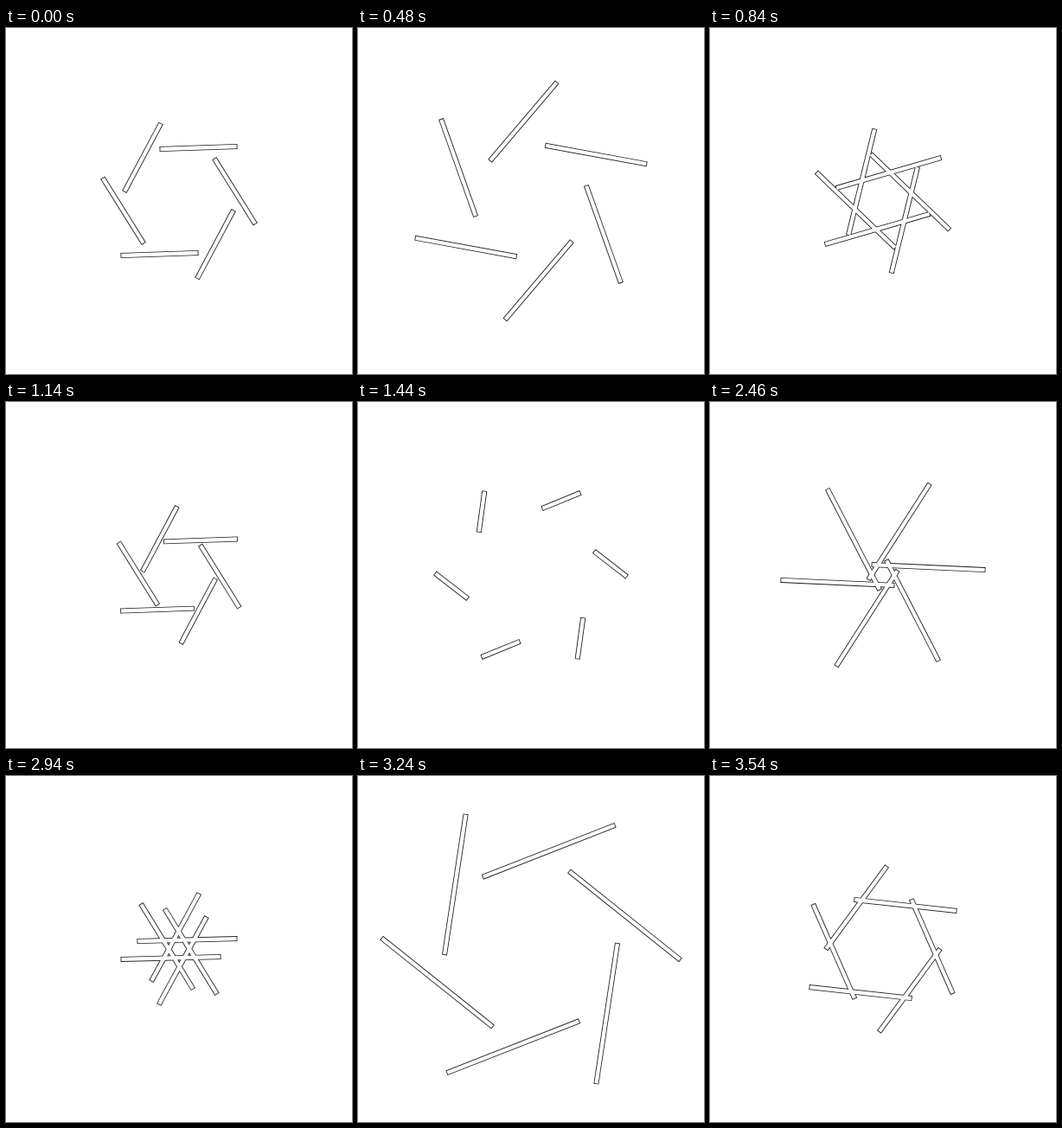
An HTML page with a canvas for the animation above (3600 ms loop, 400 px wide and 400 px high).

```html
<!DOCTYPE html>
<html lang="en">
<head>
<meta charset="utf-8">
<title>Six turning bars</title>
<style>
html, body { margin: 0; width: 100%; height: 100%; overflow: hidden; background: #fff; }
canvas { display: block; width: 400px; height: 400px; }
</style>
</head>
<body>
<canvas id="stage" width="400" height="400"></canvas>
<script>
const ctx = document.getElementById('stage').getContext('2d');
const STEPS = 60, STEP_MS = 60, TAU = Math.PI * 2, DEG = Math.PI / 180;

// step, drift x, centre y, length, extra tilt (degrees)
const keys = [
  [0, 48.4, -61.5, 89, -4.9],
  [9, 32, -66, 122, 0],
  [14, 35.1, -27, 126, 1.7],
  [24, 34.9, -64.3, 47.5, -0.8],
  [33, 13.8, -73.2, 62.3, -4.9],
  [41, 31.8, -3.4, 131, 0.5],
  [49, 24.3, -11.4, 115, 1.3],
  [54, 33, -95, 164, 0],
  [59, 36.5, -53, 118.7, -5.9]
];

// Periodic access to the key list
function keyAt(i) {
  const n = keys.length, turn = Math.floor(i / n);
  const key = keys[i - turn * n].slice();
  key[0] += turn * STEPS;
  return key;
}

// Smooth curve through the keys for every column
function pose(k) {
  let i = keys.length - 1;
  while (keys[i][0] > k) i--;
  const [a, b, c, d] = [i - 1, i, i + 1, i + 2].map(keyAt);
  const h = c[0] - b[0], u = (k - b[0]) / h, u2 = u * u, u3 = u2 * u;
  return [1, 2, 3, 4].map(j => {
    const m0 = (c[j] - a[j]) / (c[0] - a[0]) * h;
    const m1 = (d[j] - b[j]) / (d[0] - b[0]) * h;
    return (2 * u3 - 3 * u2 + 1) * b[j] + (u3 - 2 * u2 + u) * m0 +
           (3 * u2 - 2 * u3) * c[j] + (u3 - u2) * m1;
  });
}

function bars(bar, spin, width, extra, color) {
  ctx.fillStyle = color;
  for (let i = 0; i < 6; i++) {
    ctx.save();
    ctx.translate(200, 200);
    ctx.rotate(spin + i * TAU / 6);
    ctx.translate(bar.x, bar.y);
    ctx.rotate(bar.tilt);
    const len = bar.len + extra;
    ctx.fillRect(-len / 2, -width / 2, len, width);
    ctx.restore();
  }
}

function draw(k) {
  const [drift, y, len, lean] = pose(k);
  const bar = {
    x: drift + 32 * Math.cos(TAU * (k - 9) / 15),
    y,
    len,
    tilt: (lean + 9 * Math.sin(TAU * (k - 8.3) / 15)) * DEG
  };
  const spin = -TAU * k / STEPS;
  ctx.fillStyle = '#fff';
  ctx.fillRect(0, 0, 400, 400);
  // Dark bars under lighter ones leave the outline of the joined shape
  bars(bar, spin, 6, 1, '#1c1c1c');
  bars(bar, spin, 4.3, -0.7, '#fff');
}

const start = performance.now();
function tick() {
  const t = Math.max(0, performance.now() - start);
  draw(Math.floor(t / STEP_MS) % STEPS);
  requestAnimationFrame(tick);
}
tick();
</script>
</body>
</html>
```
